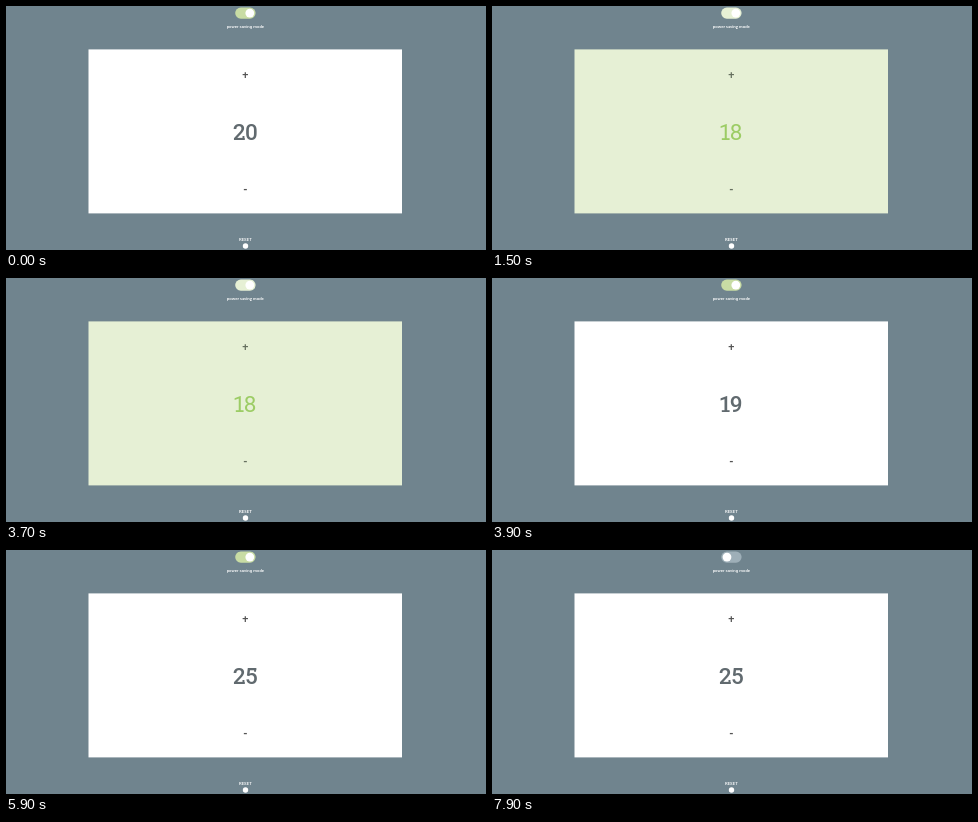
Recreate the animation shown at these times as an HTML page. Size 480 by 244 pixels, loop 8 s.

```html
<!DOCTYPE html>
<html lang="en">
<head>
<meta charset="utf-8">
<title>Thermostat</title>
<style>
  html, body { margin: 0; width: 100%; height: 100%; overflow: hidden; background: #70848e; }
  svg { display: block; width: 480px; height: 244px; }
  text { font-family: Roboto, sans-serif; text-anchor: middle; }
  .small { font-size: 4.3px; font-weight: 500; fill: #fff; }
  .sign { font-size: 11px; font-weight: 500; fill: #555; }
  .minus { font-weight: 700; }
  #card { fill: #fff; }
  #number { font-size: 22.5px; font-weight: 500; fill: #616a6f; }
  .saving #card { fill: #e6f0d5; }
  .saving #number { font-weight: 400; fill: #9ccc65; }
  .saving .small { font-family: Lato, sans-serif; font-weight: 700; }
  .saving .sign { fill: #66705f; }
</style>
</head>
<body>
<svg id="stage" viewBox="0 0 480 244">
  <rect id="track" x="229.2" y="1.5" width="20.4" height="11.2" rx="5.6"/>
  <circle id="knob" cy="7.1" r="4.4" fill="#fff"/>
  <text class="small" x="239.4" y="22.2">power saving mode</text>
  <rect id="card" x="82.5" y="43.4" width="313.5" height="164"/>
  <text class="sign" x="239.3" y="73.3">+</text>
  <g id="number"></g>
  <text class="sign minus" x="239.3" y="186.6">-</text>
  <text class="small" x="239.4" y="234.9">RESET</text>
  <circle cx="239.5" cy="240" r="2.7" fill="#fff"/>
</svg>
<script>
const LOOP = 8000, STEP = 100, MIDDLE = 239.3, BASELINE = 134;
const $ = id => document.getElementById(id);

// [start in ms, temperature]
const readings = [
  [0, 20], [1400, 19], [1500, 18], [3900, 19], [4200, 20],
  [4500, 21], [4800, 22], [5100, 23], [5500, 24], [5800, 25]
];

// Slab serifs added to the digits, relative to centre and baseline.
const serifs = {
  1: 'M-3.4 0v-1.8h7.8v1.8z',
  2: 'M3.3 0v-4h1.9v4z',
  4: 'M.6 0v-1.8h5.2v1.8z',
  5: 'M2.7 -16h1.9v3.7h-1.9z'
};
const digitWidth = d => d === '1' ? 9.7 : 12.2;

function drawNumber(value) {
  const digits = [...String(value)];
  let x = MIDDLE - digits.reduce((sum, d) => sum + digitWidth(d), 0) / 2;
  $('number').innerHTML = digits.map(d => {
    const centre = x + digitWidth(d) / 2;
    x += digitWidth(d);
    const serif = serifs[d] ? `<path d="${serifs[d]}"/>` : '';
    return `<g transform="translate(${centre} ${BASELINE})"><text>${d}</text>${serif}</g>`;
  }).join('');
}

const mix = (a, b, k) => a + (b - a) * k;
const rgb = (a, b, k) => `rgb(${a.map((v, i) => Math.round(mix(v, b[i], k)))})`;
const ON = [200, 220, 164], OFF = [158, 175, 184], PALE = [230, 240, 213];

let shown;
function render(time) {
  const t = Math.floor(time % LOOP / STEP) * STEP;
  const value = readings.filter(r => r[0] <= t).pop()[1];
  const saving = value < 19;
  if (value !== shown) drawNumber(shown = value);
  $('stage').classList.toggle('saving', saving);

  const p = Math.min(1, Math.max(0, (t - 7500) / 400));
  const off = p * p * (3 - 2 * p);
  $('knob').setAttribute('cx', mix(243.8, 235, off));
  $('track').setAttribute('fill', saving ? rgb(PALE, PALE, 0) : rgb(ON, OFF, off));
}

const start = performance.now();
function tick() {
  render(performance.now() - start);
  requestAnimationFrame(tick);
}
tick();
</script>
</body>
</html>
```
